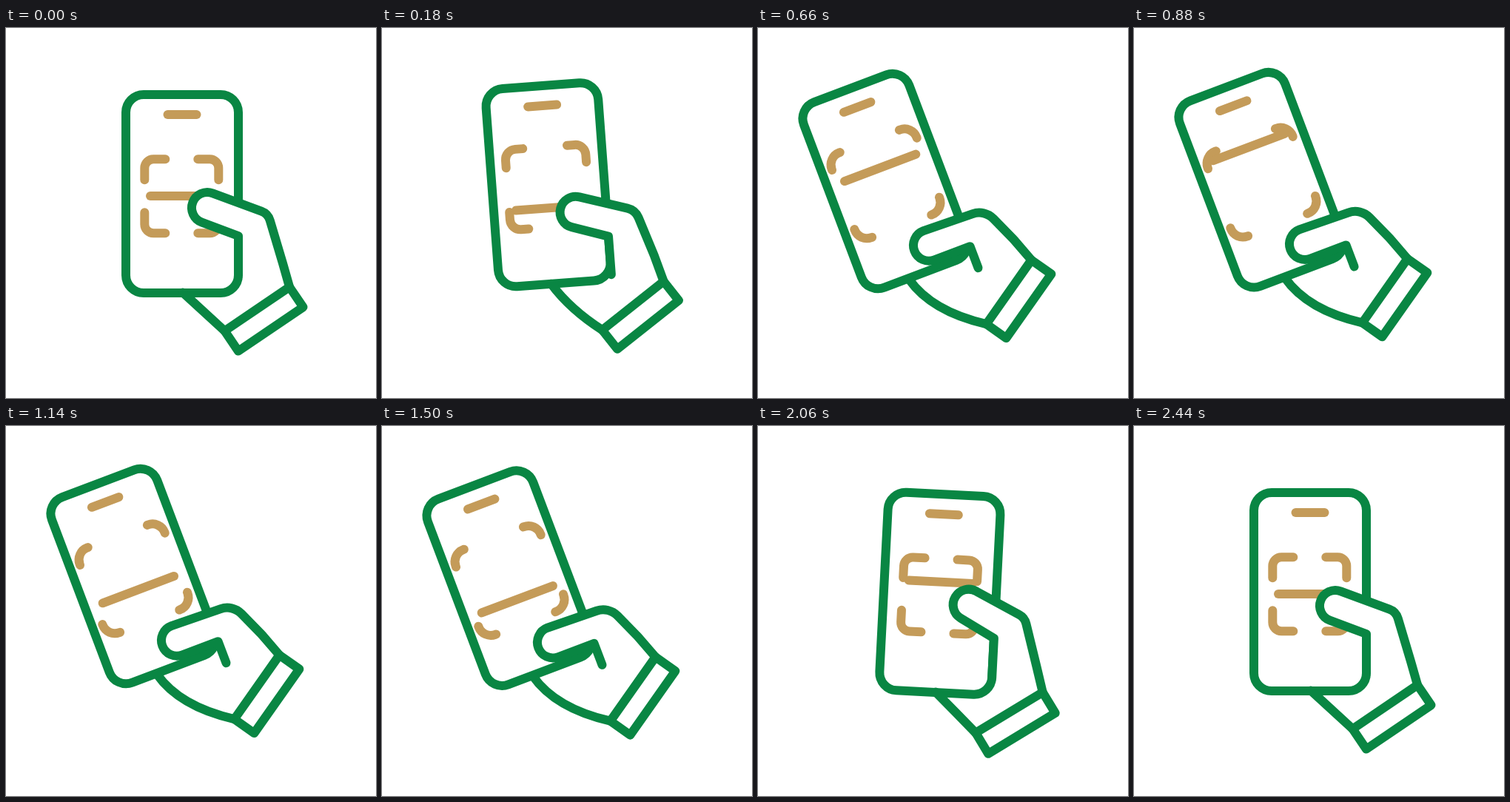
These frames come from a looping animation (500 by 500 pixels, 2560 ms). An HTML page with a canvas:

```html
<!DOCTYPE html>
<html lang="en">
<head>
<meta charset="utf-8">
<title>Scanning with a phone</title>
<style>
  html, body { margin: 0; width: 100%; height: 100%; overflow: hidden; background: #fff; }
  canvas { display: block; width: 100vw; height: 100vh; }
</style>
</head>
<body>
<canvas width="500" height="500"></canvas>
<script>
const ctx = document.querySelector('canvas').getContext('2d');
const GREEN = '#098643', GOLD = '#c49b59';
const LOOP = 2560, END = 2440;

const progress = (t, from, to) => Math.min(1, Math.max(0, (t - from) / (to - from)));
const ease = (t, from, to) => {
  const p = progress(t, from, to);
  return p * p * (3 - 2 * p);
};
const bump = (t, from, to) => Math.sin(Math.PI * progress(t, from, to)) ** 2;

// Goes 0 to 1, holds, falls back past 0 by `over` and settles at the end.
const hold = (t, rise, fall, rest, over = 0) =>
  ease(t, 0, rise) - (1 + over) * ease(t, fall, rest) + over * ease(t, rest, END);

const mix = (a, b, k) => a.map((v, i) => v + (b[i] - v) * k);

function stroke(color, trace) {
  ctx.beginPath();
  trace();
  ctx.strokeStyle = color;
  ctx.stroke();
}

function line(color, x0, y0, x1, y1) {
  stroke(color, () => { ctx.moveTo(x0, y0); ctx.lineTo(x1, y1); });
}

function drawPhone(t, spread) {
  stroke(GREEN, () => ctx.roundRect(-76, -134, 152, 268, 24));
  line(GOLD, -19.5, -107, 19.5, -107);

  const [half, arm, radius] = mix([50, 28, 12], [61.3, 18.5, 17.5], spread);
  for (const sx of [-1, 1]) {
    for (const sy of [-1, 1]) {
      const x = sx * half - 0.7, y = 3.3 + sy * half;
      stroke(GOLD, () => {
        ctx.moveTo(x, y - sy * arm);
        ctx.arcTo(x, y, x - sx * arm, y, radius);
        ctx.lineTo(x - sx * arm, y);
      });
    }
  }

  const sweep = Math.cos(3 * Math.PI * progress(t, 340, 1840));
  const scanY = 3 + 52 * sweep * hold(t, 340, 1840, 2210);
  const scanHalf = 43 + 8.5 * spread;
  line(GOLD, -scanHalf, scanY, scanHalf, scanY);
}

// Drawn in the phone's coordinates; (cx, cy) is the middle of the cuff.
function drawHand(t, spread, cx, cy) {
  const grip = hold(t, 515, 1620, 2000);
  const lean = 4.7 * bump(t, 0, 640) + 5.5 * (ease(t, 1640, 1800) - ease(t, 2080, END));
  const cuff = [[1, -1], [1, 1], [-1, 1], [-1, -1]]
    .map(([i, j]) => [cx + 43.8 * i + 9.2 * j, cy - 29.7 * i + 13.6 * j]);

  const r = 21, edge = 76;
  const tipX = 34 - 9.5 * grip + lean, tipY = 19 + 83 * grip - lean;
  const creaseY = 57 + 66 * grip;
  const knuckle = mix([116, 27], [112, 83.5], grip);
  const bend = mix([136, 94], [134.5, 135], grip);
  const dx = edge - tipX, dy = creaseY - tipY;
  const angle = Math.atan2(dy, dx) - Math.asin(r / Math.hypot(dx, dy));

  stroke(GREEN, () => {
    ctx.moveTo(edge, 111 + 43 * spread);
    ctx.lineTo(edge, creaseY);
    ctx.arc(tipX, tipY, r, angle + Math.PI / 2, angle + Math.PI * 1.5);
    ctx.arcTo(...knuckle, ...bend, 19 + 8 * grip);
    ctx.lineTo(...bend);
    ctx.lineTo(...cuff[0]);
    ctx.fill();
  });

  stroke(GREEN, () => {
    ctx.moveTo(...mix([1, 133.5], [-17, 135], spread));
    ctx.quadraticCurveTo(...mix([30, 160], [-3.7, 187], spread), ...cuff[3]);
  });

  stroke(GREEN, () => {
    cuff.forEach(p => ctx.lineTo(...p));
    ctx.closePath();
  });
}

function draw(now) {
  const t = Math.min(now % LOOP, END);
  const tilt = -20.7 * hold(t, 620, 1665, 2122, 0.2) * Math.PI / 180;
  const shift = -66 * hold(t, 625, 1635, 2122, 0.17);
  const drift = ease(t, 660, 1140) - ease(t, 1400, 2040);
  const lift = -27 * hold(t, 645, 1400, 2040, 0.3) - 4 * drift - 8 * bump(t, 2080, END);
  const sway = 10 * hold(t, 640, 1720, 2080, 0.6) - 15 * bump(t, 0, 640);
  const spread = hold(t, 430, 1650, 2030);

  const phoneX = 238 + shift, phoneY = 224 + lift + sway;
  const dx = 348.5 - 11 * tilt - phoneX, dy = 393.3 + lift - phoneY;
  const cos = Math.cos(tilt), sin = Math.sin(tilt);

  ctx.resetTransform();
  ctx.fillStyle = '#fff';
  ctx.fillRect(0, 0, 500, 500);
  ctx.lineWidth = 12;
  ctx.lineCap = ctx.lineJoin = 'round';
  ctx.translate(phoneX, phoneY);
  ctx.rotate(tilt);
  drawPhone(t, spread);
  drawHand(t, spread, dx * cos + dy * sin, dy * cos - dx * sin);
}

const start = performance.now();
function tick() {
  draw(performance.now() - start);
  requestAnimationFrame(tick);
}
tick();
</script>
</body>
</html>
```
